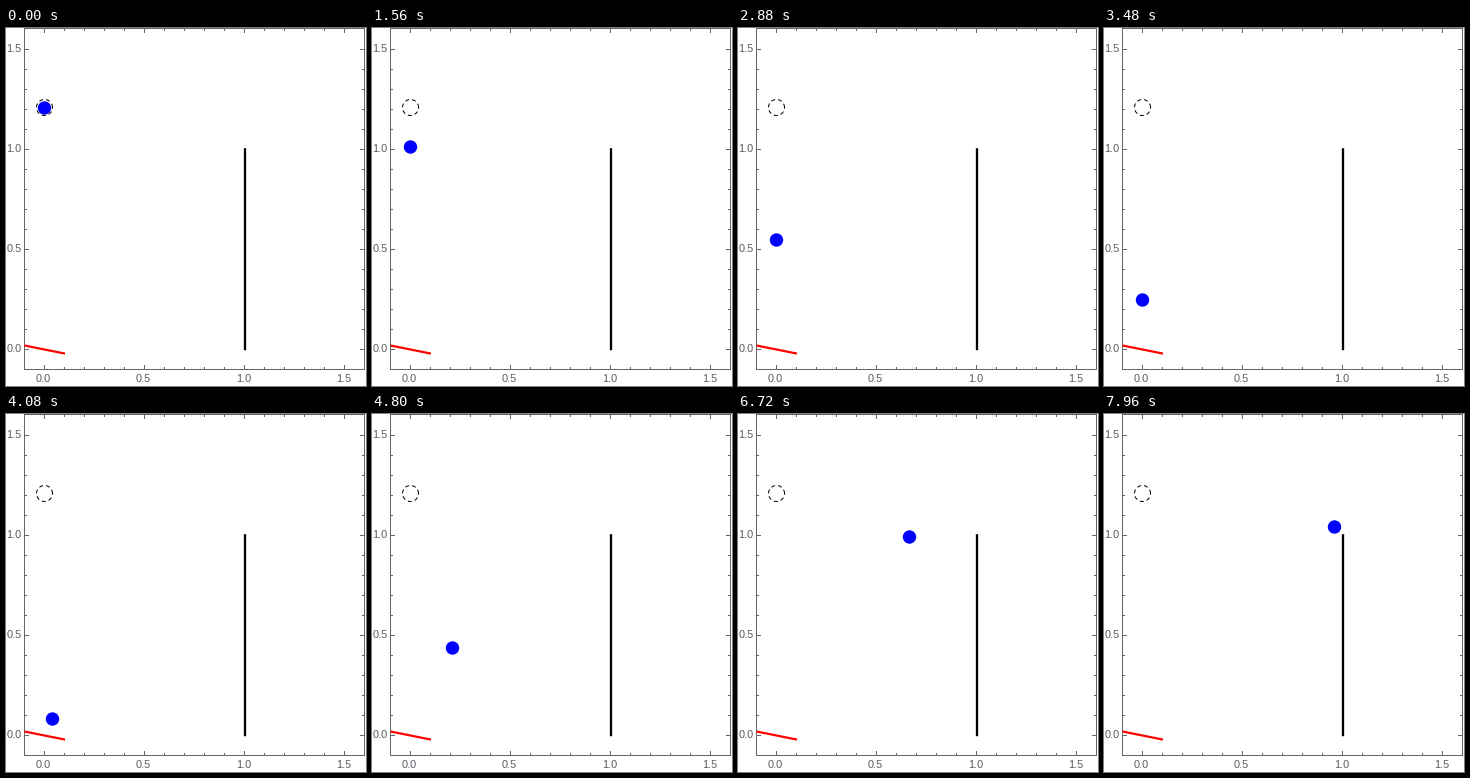
Recreate the animation shown at these times as a matplotlib script. Size 360 px wide and 358 px high, loop 8 s.

```python
import math

import numpy as np
import matplotlib.pyplot as plt
from matplotlib.animation import FuncAnimation
from matplotlib.patches import Circle

W, H, DPI = 360, 358, 64
PT = 72 / DPI                      # points per pixel
UNIT = 200                         # pixels per plot unit
X0, Y0 = 38.5, 321.5               # pixel position of the plot's origin
LEFT, RIGHT, TOP, BOTTOM = 18.5, 358.5, 0.5, 341.5
FRAME_GRAY = "#666666"
LABEL_GRAY = "#585c64"

STEP_MS, FRAMES = 40, 200
BOUNCE_T = 3.92
# Motion as polynomials in seconds, highest power first, giving pixels
FALL_Y = (15.47, 1.238, 79.915)
REBOUND_Y = (15.55, -114.94, 323.09)
REBOUND_X = (47.4, 38.64)

fig = plt.figure(figsize=(W / DPI, H / DPI), dpi=DPI, facecolor="white")
ax = fig.add_axes([0, 0, 1, 1])
ax.set_xlim(0, W)
ax.set_ylim(H, 0)
ax.axis("off")


def line(xs, ys, color, width=1.0, z=2):
    ax.plot(xs, ys, color=color, lw=width * PT, solid_capstyle="butt",
            snap=False, zorder=z)


def label(x, y, value, ha):
    ax.text(x, y, f"{value:.1f}", ha=ha, va="center_baseline", color=LABEL_GRAY,
            family="Liberation Sans", fontsize=11 * PT)


def draw_frame():
    for y in (TOP, BOTTOM):
        line([LEFT - 0.5, RIGHT + 0.5], [y, y], FRAME_GRAY)
    for x in (LEFT, RIGHT):
        line([x, x], [TOP - 0.5, BOTTOM + 0.5], FRAME_GRAY)
    for i in range(16):
        major = i % 5 == 0
        size = 4.5 if major else 2.5
        x, y = X0 + i * UNIT / 10, Y0 - i * UNIT / 10
        line([x, x], [BOTTOM, BOTTOM - size], FRAME_GRAY)
        line([x, x], [TOP, TOP + size], FRAME_GRAY)
        line([LEFT, LEFT + size], [y, y], FRAME_GRAY)
        line([RIGHT, RIGHT - size], [y, y], FRAME_GRAY)
        if major:
            label(x - 1, 350, i / 10, "center")
            label(15.4, y - 1.3, i / 10, "right")


def ball_position(n):
    t = n * STEP_MS / 1000
    if t < BOUNCE_T:
        x, y = X0, np.polyval(FALL_Y, t)
    else:
        x = np.polyval(REBOUND_X, t - BOUNCE_T)
        y = np.polyval(REBOUND_Y, t - BOUNCE_T)
    # the ball moves in whole pixels
    return math.floor(x) + 0.5, math.floor(y + 0.5)


draw_frame()
line([239, 239], [120.2, 322.2], "black", 2.3)
line([18.5, 59], [317.5, 325.6], "red", 2.2, z=3)

angle = np.linspace(0, 2 * np.pi, 121)
ax.plot(X0 + 8 * np.cos(angle), 79.5 - 8 * np.sin(angle), color="black",
        lw=PT, dashes=(4, 3), dash_capstyle="butt", zorder=3)

ball = ax.add_patch(Circle(ball_position(0), 6.7, fc="blue", ec="none", zorder=4))


def update(n):
    ball.center = ball_position(n)
    return (ball,)


anim = FuncAnimation(fig, update, frames=FRAMES, interval=STEP_MS,
                     repeat=True, repeat_delay=0, blit=False)
plt.show()
```
